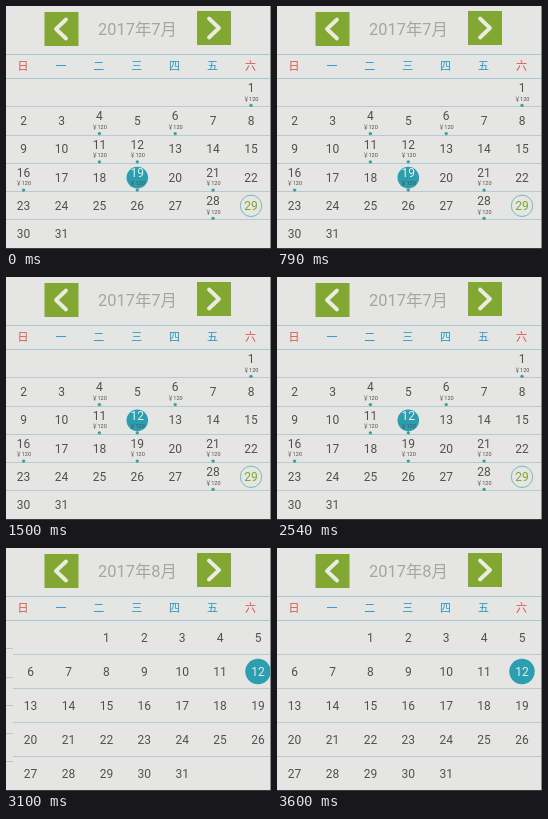
These frames come from a looping animation (265 px wide and 243 px high, 4.76 s). An HTML page:

```html
<!DOCTYPE html>
<html lang="zh">
<head>
<meta charset="utf-8">
<title>Calendar</title>
<style>
  html, body { margin: 0; width: 100%; height: 100%; overflow: hidden; background: #e5e5e3; }
  svg { display: block; width: 100vw; height: 100vh; }
  text { font-family: Roboto, "Noto Sans CJK SC", "Noto Sans CJK JP", "Noto Sans CJK", sans-serif; text-anchor: middle; }
</style>
</head>
<body>
<svg id="stage" viewBox="0 0 265 243"></svg>
<script>
const LOOP = 4760, WIDTH = 265, TOP = 72.5;
const TEAL = '#2b9eb0', INK = '#50504f', PALE = '#e6f0f0', TODAY = '#7da825', RULE = '#b5cad2';
const stage = document.getElementById('stage');

// Each step holds until the next one: start, scroll offset, selected July day, title month
const steps = [
  [0, 0, 19, 7],
  [1220, 0, 12, 7],
  [2820, 116.7, 12, 8],
  [3100, 258, 12, 8],
  [3250, 265, 12, 8]
];

function add(parent, tag, attrs, content) {
  const node = document.createElementNS('http://www.w3.org/2000/svg', tag);
  for (const key in attrs) node.setAttribute(key, attrs[key]);
  if (content !== undefined) node.textContent = content;
  parent.append(node);
  return node;
}

const label = (parent, x, y, size, fill, content, weight = 400) =>
  add(parent, 'text', { x, y: y + size * 0.355, 'font-size': size, 'font-weight': weight, fill }, content);

const rule = (parent, y, stroke) =>
  add(parent, 'path', { d: `M0 ${y}H${WIDTH}`, stroke, 'stroke-width': 1 });

const show = (node, on) => node.setAttribute('visibility', on ? 'visible' : 'hidden');

const colX = col => 17.6 + col * 37.9;

function buildMonth(x, first, rowHeight, rows, drawDay) {
  const page = add(stage, 'g', {});
  const grid = add(page, 'g', { transform: `translate(${x} 0)` });
  for (let r = 1; r < rows; r++) rule(grid, Math.floor(TOP + r * rowHeight) + 0.5, RULE);
  for (let day = 1; day <= 31; day++) {
    const cell = first + day - 1;
    drawDay(grid, day, colX(cell % 7), TOP + (Math.floor(cell / 7) + 0.5) * rowHeight);
  }
  return page;
}

const priced = [1, 4, 6, 11, 12, 16, 19, 21, 28];
const marks = {};
const today = {};

const july = buildMonth(0, 6, 28.25, 6, (grid, day, x, y) => {
  const hasPrice = priced.includes(day);
  if (day === 12 || day === 19) {
    marks[day] = { disc: add(grid, 'circle', { cx: x, cy: y + 0.2, r: 10.8, fill: TEAL }) };
  }
  if (day === 29) {
    today.ring = add(grid, 'circle', { cx: x, cy: y + 0.2, r: 10.7, fill: 'none', stroke: '#6bb5ba', 'stroke-width': 0.9 });
  }
  const number = label(grid, x, y - (hasPrice ? 4.7 : 0), 12, INK, day);
  if (marks[day]) marks[day].number = number;
  if (day === 29) today.number = number;
  if (hasPrice) {
    label(grid, x, y + 5.9, 5.6, INK, '￥120');
    add(grid, 'circle', { cx: x, cy: y + 12.7, r: 1.7, fill: '#3f9f9f' });
  }
});

const august = buildMonth(WIDTH, 2, 33.9, 5, (grid, day, x, y) => {
  if (day === 12) add(grid, 'circle', { cx: x, cy: y + 0.2, r: 12.7, fill: TEAL });
  label(grid, x, y + 0.2, 12, day === 12 ? PALE : INK, day);
});

function arrow(x, y, path) {
  add(stage, 'rect', { x, y, width: 34, height: 34, fill: '#82a833' });
  add(stage, 'path', {
    d: path, fill: 'none', stroke: '#e9ede0', 'stroke-width': 3.8,
    'stroke-linecap': 'round', 'stroke-linejoin': 'round'
  });
}

arrow(38.5, 6, 'M60 13.5L50 23L60 32.5');
arrow(191, 5, 'M203 12.5L213 22L203 31.5');
const title = label(stage, 131.5, 23, 16.4, '#a5a5a4', '');
rule(stage, 48.5, '#a9c8d3');
rule(stage, 72.5, '#a9c8d3');
[...'日一二三四五六'].forEach((name, i) =>
  label(stage, colX(i) - 0.6, 60, 11, i % 6 ? '#2299c6' : '#d9544c', name, 500));
add(stage, 'path', { d: 'M264.5 0V243', stroke: '#8b8b8a', 'stroke-width': 1 });
add(stage, 'path', { d: 'M0 242.5H265', stroke: '#3c3c3c', 'stroke-width': 1 });

let current;
function render(time) {
  const t = time % LOOP;
  const step = steps.filter(s => s[0] <= t).pop();
  if (step === current) return;
  current = step;
  const [, shift, selected, month] = step;
  for (const page of [july, august]) page.setAttribute('transform', `translate(${-shift} 0)`);
  for (const day in marks) {
    const on = +day === selected;
    show(marks[day].disc, on);
    marks[day].number.setAttribute('fill', on ? PALE : INK);
  }
  // Today is highlighted only while its own month is active
  show(today.ring, month === 7);
  today.number.setAttribute('fill', month === 7 ? TODAY : INK);
  title.textContent = `2017年${month}月`;
}

const start = performance.now();
function tick() {
  render(performance.now() - start);
  requestAnimationFrame(tick);
}
tick();
</script>
</body>
</html>
```
